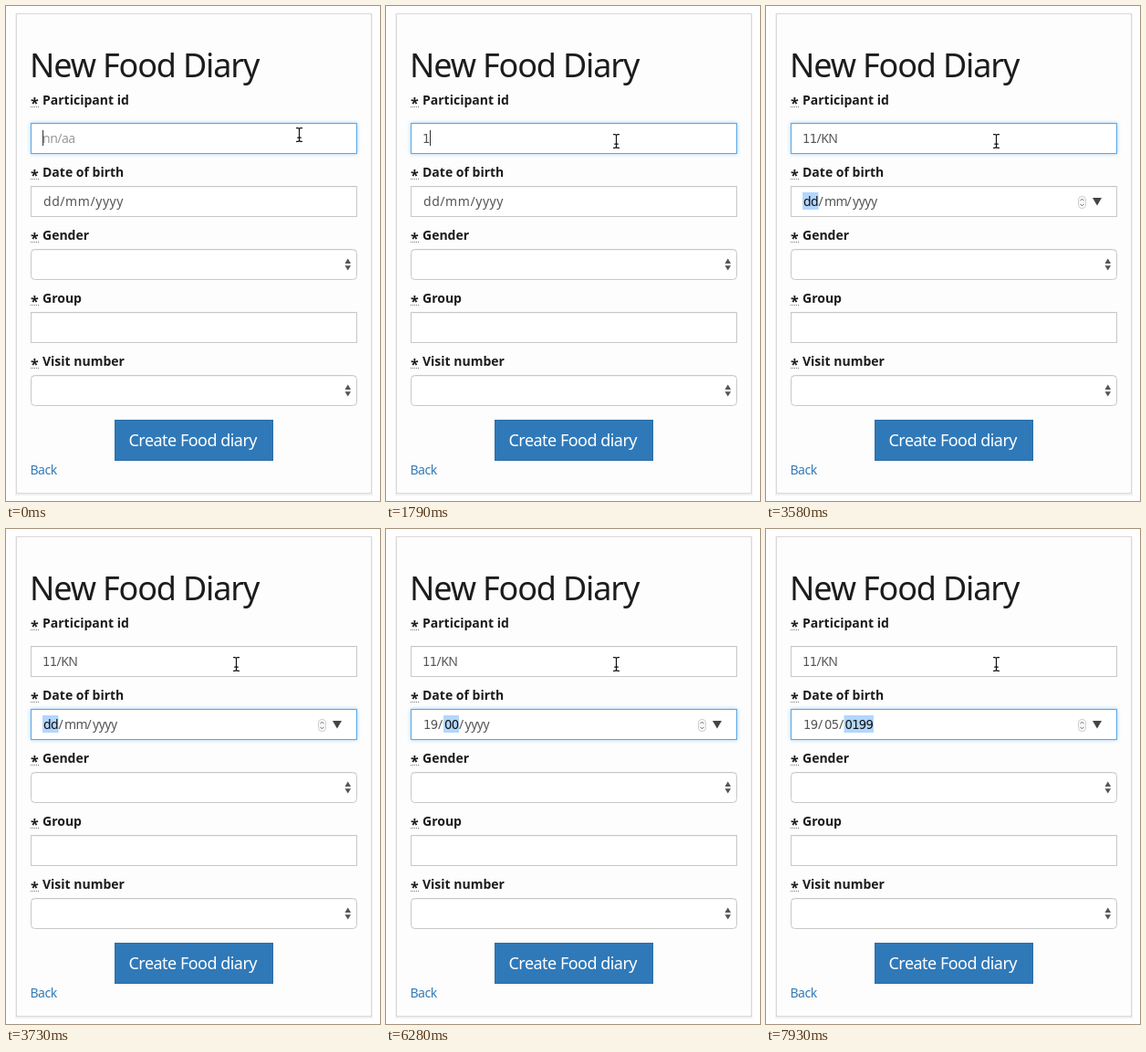
Write an HTML page that moves like this. It is 410 by 542 pixels and loops after 8 s.

```html
<!DOCTYPE html>
<html lang="en">
<head>
<meta charset="utf-8">
<title>New Food Diary</title>
<style>
  html, body { margin: 0; width: 100%; height: 100%; overflow: hidden; background: #fefefe; }
  svg { display: block; width: 100vw; height: 100vh; }
  text { font: 14px "Noto Sans", "Open Sans", sans-serif; letter-spacing: -.036em; fill: #555; white-space: pre; }
  .title { font-size: 36px; letter-spacing: -.032em; fill: #1c1c1c; }
  .label { font-weight: 700; letter-spacing: 0; fill: #1c1c1c; }
  .star { font-size: 16px; }
  .hint { fill: #999; }
  .idle { letter-spacing: .04em; }
  .num { font: 13.2px "DejaVu Sans", sans-serif; letter-spacing: -.057em; }
  .picked { fill: #111; }
  .button { font-size: 18px; letter-spacing: -.029em; fill: #fff; }
  .link { fill: #337ab7; }
</style>
</head>
<body>
<svg id="stage" viewBox="0 0 410 542">
  <defs>
    <filter id="blur" x="-5%" y="-40%" width="110%" height="180%"><feGaussianBlur stdDeviation="2"/></filter>
  </defs>
  <rect x="11.5" y="9.5" width="389" height="525" fill="none" stroke="#000" stroke-opacity=".05" stroke-width="3"/>
  <rect x="11.5" y="8.5" width="389" height="525" fill="#fdfdfd" stroke="#d9d9d9"/>
  <text class="title" x="26" y="78">New Food Diary</text>
  <g id="form"></g>
  <rect x="119.5" y="453.5" width="173" height="44" fill="#2f79b9" stroke="#2e6da4"/>
  <text class="button" x="134.5" y="482">Create Food diary</text>
  <text class="link" x="26.5" y="513">Back</text>
  <g id="live"></g>
  <g id="pointer" fill="none" stroke-linecap="round">
    <path id="beam" d="M-3-7.3H-1.5Q0-7.3 0-6V6Q0 7.3-1.5 7.3H-3M3-7.3H1.5Q0-7.3 0-6M0 6Q0 7.3 1.5 7.3H3M-1.8 3.2H1.8" stroke="#fff" stroke-width="2.6"/>
    <use href="#beam"/>
  </g>
</svg>
<script>
const LOOP = 8000;
const $ = id => document.getElementById(id);

const rect = (x, y, w, h, attrs) => `<rect x="${x}" y="${y}" width="${w}" height="${h}" ${attrs}/>`;
const text = (x, y, str, cls = "") => `<text x="${x}" y="${y}" class="${cls}">${str}</text>`;
const shape = (d, fill = "#555") => `<path d="${d}" fill="${fill}"/>`;

function label(y, name) {
  return text(27, y + 3.5, "*", "label star") + text(40, y, name, "label") +
    `<path d="M27 ${y + 2.5}h9" stroke="#777" stroke-dasharray="1 1"/>`;
}

function box(y, radius = 0, focused = false) {
  const glow = focused ? rect(27, y, 358, 34, 'fill="#66afe9" opacity=".6" filter="url(#blur)"') : "";
  const line = focused ? "#5aa9e8" : "#c8c8c8";
  return glow + rect(27.5, y + .5, 357, 33, `rx="${radius}" fill="#fff" stroke="${line}"`) +
    `<path d="M28.5 ${y + 1.5}H383.5" stroke="#000" stroke-opacity=".05"/>`;
}

function select(y) {
  return box(y, 4) + shape(`M371.5 ${y + 16}h6.6l-3.3-5.4zM371.5 ${y + 18.2}h6.6l-3.3 5.4z`);
}

$("form").innerHTML =
  label(108, "Participant id") + label(187, "Date of birth") +
  label(256, "Gender") + select(266) +
  label(325, "Group") + box(335) +
  label(394, "Visit number") + select(404);

// Step tracks: [start, ...state]
const pointer = [[0, 321.5, 141], [150, 280.5, 139], [290, 254, 147], [440, 252.5, 148]];
const typing = [
  [0, "", 40.5], [290, "", 0], [740, "", 40.5], [1340, "", 0],
  [1790, "1", 48.5], [2090, "11", 55.5], [2230, "11/", 61.5], [2680, "11/", 0],
  [2830, "11/K", 69.5], [3130, "11/KN", 78.5], [3580, "11/KN", 0]
];
const dates = [
  [0, "dd/mm/yyyy", -1], [3580, "dd/mm/yyyy", 0], [4180, "01/mm/yyyy", 0],
  [4480, "19/mm/yyyy", 1], [6280, "19/00/yyyy", 1], [6880, "19/05/yyyy", 2],
  [7480, "19/05/0001", 2], [7780, "19/05/0019", 2], [7930, "19/05/0199", 2]
];
const at = (track, t) => track.findLast(step => step[0] <= t).slice(1);

function idField(t) {
  const [value, caret] = at(typing, t);
  let out = box(128, 0, t < 3730);
  if (value) out += text(40, 150, value.slice(0, 2), "num") + text(55.5, 150, value.slice(2));
  else out += text(40, 150, "nn/aa", "hint");
  if (caret) out += rect(caret - .5, 136, 1, 17, 'fill="#333"');
  return out;
}

const widths = { dd: 16, mm: 24, yyyy: 27.5 };

function dateField(t) {
  const [value, active] = at(dates, t);
  let out = box(197, 0, t >= 3730);
  if (active < 0) return out + text(41, 219, value, "idle");
  let x = 41;
  value.split("/").forEach((part, i) => {
    const isNum = /\d/.test(part);
    const w = widths[part] || part.length * 7.75;
    if (i === active) out += rect(x - 1, 204, w + 1.5, 19, 'fill="#b2d6fd"');
    out += text(x, 219, part, (isNum ? "num " : "") + (i === active ? "picked" : ""));
    if (i < 2) out += text(x + w + .5, 219, "/");
    x = i ? x + w + 7 : 64;
  });
  return out +
    rect(342.5, 208.5, 8, 13, 'rx="3.5" fill="#fafafa" stroke="#d0d0d0"') +
    `<path d="M344.5 213.2l2-2 2 2M344.5 216.8l2 2 2-2" fill="none" stroke="#666"/>` +
    shape("M358 210h10l-5 8.5z", "#444");
}

function draw(t) {
  const [x, y] = at(pointer, t);
  $("live").innerHTML = idField(t) + dateField(t);
  $("pointer").setAttribute("transform", `translate(${x} ${y})`);
}

// The dark stroke sits over the white halo
const ink = $("beam").cloneNode();
ink.removeAttribute("id");
ink.setAttribute("stroke", "#111");
ink.setAttribute("stroke-width", "1.2");
$("pointer").querySelector("use").replaceWith(ink);

const start = performance.now();
function tick() {
  draw((performance.now() - start) % LOOP);
  requestAnimationFrame(tick);
}
tick();
</script>
</body>
</html>
```
